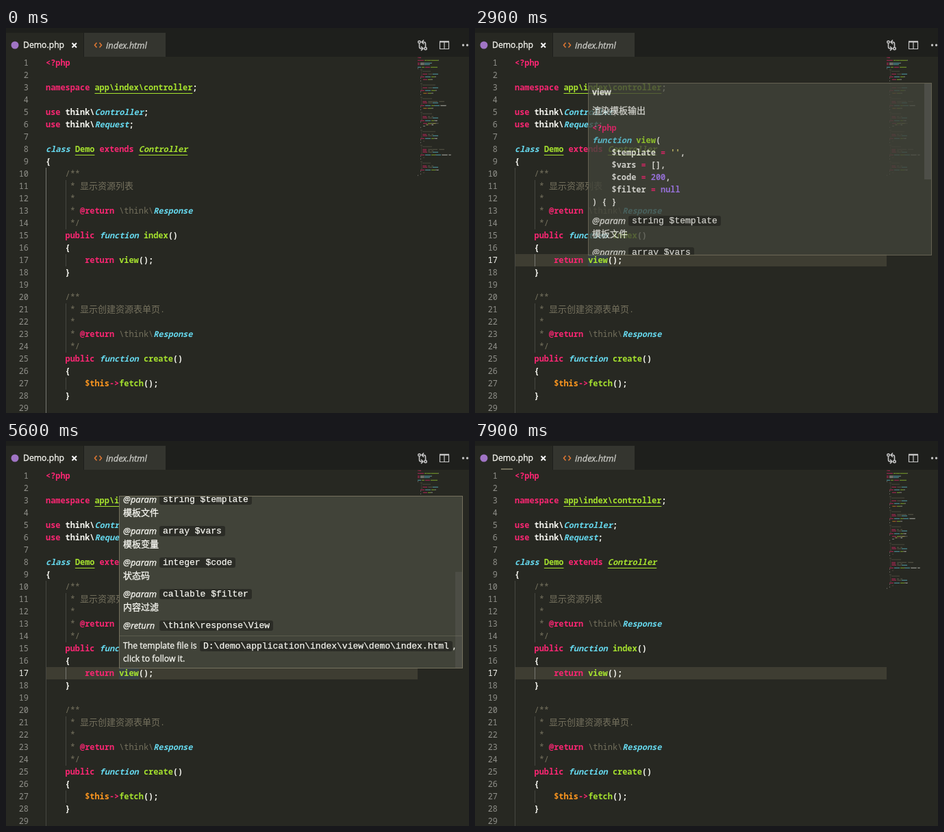
Write an HTML page with a canvas that moves like this. It is 676 by 562 pixels and loops after 8 s.

```html
<!DOCTYPE html>
<html lang="en">
<head>
<meta charset="utf-8">
<title>Code editor hover</title>
<style>
html, body { margin: 0; width: 100%; height: 100%; overflow: hidden; background: #272822; }
#stage { position: relative; width: 676px; height: 562px; overflow: hidden; background: #272822; color: #f8f8f2; }
#stage div, canvas, svg { position: absolute; }
svg { left: 0; top: 0; }
.mono { font: 600 11.912px "Noto Sans Mono", "DejaVu Sans Mono", monospace; white-space: pre; }
.ui { font: 12.2px "Open Sans", "Noto Sans CJK SC", "Noto Sans CJK JP", sans-serif; white-space: pre; -webkit-text-stroke: .3px; }
.ui i, .ui .i { font-size: 12.9px; }
.cjk { font: 13px "Noto Sans CJK SC", "Noto Sans CJK JP", sans-serif; line-height: 0; }
.c { font-weight: 400; }
.t, .i { font-style: italic; }
.u { text-decoration: underline 1px; text-underline-offset: 4px; text-decoration-skip-ink: none; }

#tabs { left: 0; top: 0; width: 676px; height: 42px; background: #1e1f1c; }
.tab { top: 7px; height: 35px; line-height: 36px; box-sizing: border-box; }

.row { left: 58px; height: 18px; line-height: 18px; }
.num { left: 0; width: 33px; height: 18px; line-height: 18px; text-align: right; font-weight: 500; color: #90908a; }
.guide { width: 1px; background: #464741; }
#outer { animation: outer 8s step-end infinite; }
#inner { animation: inner 8s step-end infinite; }
#num17 { animation: number 8s step-end infinite; }
#active { left: 58px; top: 330px; width: 543px; height: 18px; background: #3e3d32; animation: active 8s step-end infinite; }
#word { left: 165px; top: 330px; width: 29px; height: 18px; background: #264f7840; animation: word 8s step-end infinite; }
#cursor { left: 214px; top: 330px; width: 2px; height: 18px; background: #f8f8f0; animation: blink 8s step-end infinite; }
#progress { left: 1px; top: 40px; width: 17px; height: 2px; background: #75715e; animation: progress 8s step-end infinite; }

#hover { left: 165px; top: 80px; width: 502px; height: 252px; box-sizing: border-box; overflow: hidden;
  background: #414339; border: 1px solid #75715e; animation: hover 8s step-end infinite; }
#content { left: 0; top: 0; width: 500px; height: 446px; animation: scroll 8s step-end infinite; }
#content > div { left: 5px; height: 20px; line-height: 20px; }
#content .cjk { font-weight: 500; }
#content .chip { height: 15px; line-height: 15px; padding: 0 5px; border-radius: 3px; background: #0a0a0a66;
  font: 13px/15px "Liberation Mono", monospace; white-space: pre; -webkit-text-stroke: .25px; }
#content .rule { left: 0; width: 500px; height: 1px; background: #5b5b4c; }
#slider { left: 490px; top: 0; width: 10px; height: 140px; animation: slide 8s step-end infinite; }

#menu { left: 174px; top: 340px; width: 298px; height: 215px; box-sizing: border-box; padding: 2px 1px 2px 3px;
  display: flex; flex-direction: column; background: #f2f2f2; border: 1px solid #ccc; color: #000;
  font-size: 11.3px; -webkit-text-stroke: 0; animation: menu 8s step-end infinite; }
#stage #menu div { position: static; display: flex; justify-content: space-between; height: 23px; line-height: 22px;
  flex: none; padding: 0 20px 0 28px; }
#stage #menu .sep { flex: 1; height: auto; padding: 0; background: linear-gradient(#d7d7d7, #d7d7d7) 28px 50% / 100% 1px no-repeat; }
#menu div:first-child { animation: pick 8s step-end infinite; }

@keyframes outer { 0% { background: #767771; } 8.75%, 100% { background: #464741; } }
@keyframes inner { 0% { background: #464741; } 8.75%, 100% { background: #767771; } }
@keyframes number { 0% { color: #90908a; } 8.75%, 100% { color: #f8f8f2; } }
@keyframes active { 0% { opacity: 0; } 8.75%, 100% { opacity: 1; } }
@keyframes word { 0%, 75%, 100% { opacity: 0; } 36.25% { opacity: 1; } }
@keyframes blink {
  0%, 12.5%, 25%, 36.25%, 47.5%, 58.75%, 70% { opacity: 0; left: 214px; }
  8.75%, 18.75%, 30%, 41.25%, 53.75%, 65% { opacity: 1; left: 214px; }
  75%, 98.75%, 100% { opacity: 0; left: 179px; }
  93.75% { opacity: 1; left: 179px; }
}
@keyframes hover { 0%, 75%, 100% { opacity: 0; } 36.25% { opacity: .8; } 37.5% { opacity: 1; } }
@keyframes scroll { 0% { top: 0; } 47.5% { top: -100px; } 52.5%, 100% { top: -196px; } }
@keyframes slide {
  0% { top: 0; background: #79797966; }
  47.5% { top: 56px; background: #79797966; }
  52.5%, 100% { top: 110px; background: #79797930; }
}
@keyframes menu { 0%, 93.75%, 100% { opacity: 0; } 76.25% { opacity: .5; } 77.5% { opacity: 1; } }
@keyframes pick { 0%, 100% { background: #f2f2f2; } 82.5% { background: #91c9f7; } }
@keyframes progress {
  0% { opacity: 0; left: 1px; }
  96.25% { opacity: 1; left: 1px; }
  97.5% { opacity: 1; left: 19px; }
  98.75%, 100% { opacity: 1; left: 38px; }
}
</style>
</head>
<body>
<div id="stage">
  <div id="tabs" class="ui">
    <div class="tab" style="left:0;width:113px;padding-left:25px;background:#272822">Demo.php</div>
    <div class="tab i" style="left:114px;width:119px;padding-left:32px;background:#34352f;color:#ccccc7">index.html</div>
    <svg width="676" height="42" fill="none" stroke="#c5c5c5">
      <circle cx="13" cy="25" r="5.5" fill="#a074c4" stroke="none"/>
      <path d="M96.5 22l6.500 6.500M103 22l-6.500 6.500" stroke="#fff" stroke-width="1.9"/>
      <path d="M132.500 21.500L129.500 25l3 3.500M136.500 21.500l3 3.500l-3 3.500" stroke="#e37933" stroke-width="1.5"/>
      <g stroke-width="1.6">
        <circle cx="603.5" cy="20.500" r="1.700"/><circle cx="612.5" cy="30" r="1.700"/>
        <path d="M603.500 22.500v5q0 2.500 2.500 2.500h2M606 27l3 3l-3 3M612.500 28v-5q0-2.500-2.500-2.500h-2M610 17.500l-3 3l3 3"/>
      </g>
      <path d="M633.500 20.500h13v10h-13zM640 20v11" stroke-width="1.2"/>
      <path d="M633 20h14" stroke-width="2.4"/>
      <g fill="#c5c5c5" stroke="none"><circle cx="667.500" cy="25" r="1.700"/><circle cx="673.500" cy="25" r="1.700"/></g>
    </svg>
  </div>
  <div id="active"></div>
  <div id="word"></div>
  <div id="editor" class="mono"></div>
  <canvas id="minimap" width="75" height="180" style="left:601px;top:42px"></canvas>
  <div id="cursor"></div>
  <div id="progress"></div>
  <div id="hover"><div id="content"></div><div id="slider"></div></div>
  <div id="menu" class="ui"></div>
</div>
<script>
const color = { k: '#f92672', t: '#66d9ef', f: '#a6e22e', c: '#75715e', p: '#fd971f', n: '#ae81ff', s: '#e6db74' };
const byId = id => document.getElementById(id);

// Markup: {classes:text}; the first class letter picks the colour.
const parse = line => [...line.matchAll(/\{([\w ]+):([^}]*)\}|[^{]+|\{/g)].map(m => [m[1] || '', m[2] ?? m[0]]);
const render = line => parse(line).map(([cls, text]) => {
  const html = text.replace('<', '&lt;').replace(/[一-龥]+/g, '<span class="cjk">$&</span>');
  return cls ? `<span class="${cls}" style="color:${color[cls[0]]}">${html}</span>` : html;
}).join('');

const method = (title, params, name, args, body) => [
  '    {c:/**}',
  `     {c:* ${title}}`,
  '     {c:*}',
  ...params.map(p => `     {c:* }{k:@param}{c:  ${p}}`),
  String.raw`     {c:* }{k:@return}{c: \think\}{t:Response}`,
  '     {c:*/}',
  `    {k:public} {t:function} {f:${name}}(${args})`,
  '    {',
  ...body.map(b => '        ' + b),
  '    }'
];
const request = '{t:Request} $request', id = '$id', todo = ['{c://}'];
const requestDoc = String.raw`\think\Request  $request`, idDoc = 'int  $id';
const fetchBody = ['{p:$this}{k:->}{f:fetch}();'];
const methods = [
  method('显示资源列表', [], 'index', '', ['{k:return} {f:view}();']),
  method('显示创建资源表单页.', [], 'create', '', fetchBody),
  method('保存新建的资源', [requestDoc], 'save', request, fetchBody),
  method('显示指定的资源', [idDoc], 'read', id,
    ["{k:return} {f:fetch}({s:'read'}, [", "    {s:'id'} {k:=>} $id", ']);']),
  method('显示编辑资源表单页.', [idDoc], 'edit', id, todo),
  method('保存更新的资源', [requestDoc, idDoc], 'update', `${request}, ${id}`, todo),
  method('删除指定资源', [idDoc], 'delete', id, todo)
];
const lines = [
  ...String.raw`{k:<?php}

{k:namespace} {f u:app\index\controller};

{k:use} think\{t:Controller};
{k:use} think\{t:Request};

{t:class} {f u:Demo} {k:extends} {f u i:Controller}
{`.split('\n'),
  ...methods.flatMap((m, i) => i ? ['', ...m] : m),
  '}'
];

const guide = (x, first, last, name = '') =>
  `<div class="guide" id="${name}" style="left:${x}px;top:${24 + first * 18}px;height:${(last - first + 1) * 18}px"></div>`;
byId('editor').innerHTML =
  guide(58, 10, 29, 'outer') + guide(87, 11, 14) + guide(87, 17, 17, 'inner') + guide(87, 21, 24) + guide(87, 27, 27) +
  lines.slice(0, 29).map((line, i) => {
    const top = `style="top:${41 + i * 18}px"`;
    return `<div class="num" id="num${i + 1}" ${top}>${i + 1}</div><div class="row" ${top}>${render(line)}</div>`;
  }).join('');

const map = byId('minimap').getContext('2d');
lines.forEach((line, row) => {
  let x = 0;
  for (const [cls, text] of parse(line)) {
    map.fillStyle = color[cls[0]] || '#f8f8f2';
    for (const ch of text) {
      const width = ch > '一' ? 2 : 1;
      if (ch !== ' ') {
        map.globalAlpha = /[a-z]/i.test(ch) ? .5 : .3;
        map.fillRect(x, row * 2 + 1, width, 1);
        map.globalAlpha = .15;
        map.fillRect(x, row * 2, width, 1);
      }
      x += width;
    }
  }
});

// Hover content: each line is placed by its vertical centre on the stage.
const place = (y, html, cls = 'ui', left = 5) =>
  `<div class="${cls}" style="top:${y - 81}px;left:${left}px">${html}</div>`;
const text = (y, html, left) => place(y - 10, html, 'ui', left);
const chip = (y, html, left = 58) => place(y - 7, html, 'chip', left);
const cjk = (y, s) => text(y + 1, `<span class="cjk">${s}</span>`);
const tag = (y, name, code, note = '') => text(y, `<i>@${name}</i>`) + chip(y, code) + cjk(y + 19, note);
const signature = [
  '{k:<?php}', '{t:function} {f:view}(', "    $template {k:=} {s:''},", '    $vars {k:=} [],',
  '    $code {k:=} {n:200},', '    $filter {k:=} {n:null}', ') { }'
];
byId('content').innerHTML =
  text(94, '<b>view</b>') + cjk(120, '渲染模板输出') +
  signature.map((s, i) => place(135 + i * 18, render(s), 'mono')).join('') +
  tag(281, 'param', 'string $template', '模板文件') +
  tag(327, 'param', 'array $vars', '模板变量') +
  tag(373, 'param', 'integer $code', '状态码') +
  tag(419, 'param', 'callable $filter', '内容过滤') +
  tag(465, 'return', String.raw`\think\response\View`) +
  place(480, '', 'rule', 0) +
  text(495, 'The template file is') +
  chip(495, String.raw`D:\demo\application\index\view\demo\index.html`, 117) +
  text(495, ',', 487) + text(514, 'click to follow it.');

const commands = `Go to Definition|F12
Peek Definition|Alt+F12
-
Change All Occurrences|Ctrl+F2
Format Document|Shift+Alt+F
-
Cut|Ctrl+X
Copy|Ctrl+C
Paste|Ctrl+V
-
Command Palette...|Ctrl+Shift+P`;
byId('menu').innerHTML = commands.split('\n').map(c => c === '-' ? '<div class="sep"></div>' :
  `<div>${c.split('|').map(s => `<span>${s}</span>`).join('')}</div>`).join('');
</script>
</body>
</html>
```
